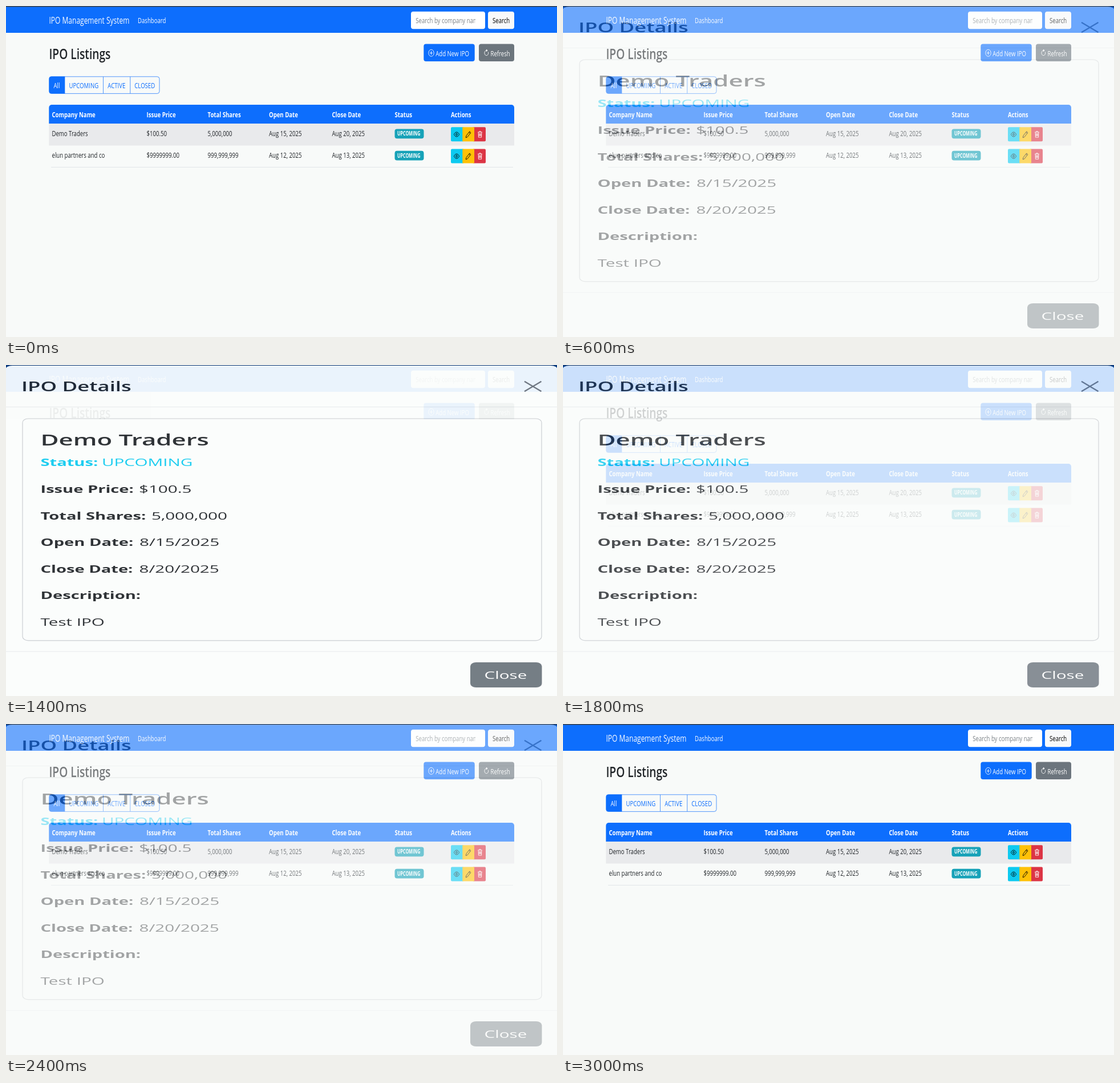
Animation, 966 px wide and 580 px high, one loop 3100 ms. Source, as an HTML page:

```html
<!DOCTYPE html>
<html lang="en">
<head>
<meta charset="utf-8">
<title>IPO Management System</title>
<style>
  html, body { margin: 0; width: 100%; height: 100%; overflow: hidden; background: #fbfdfc; }
  svg { position: absolute; left: 0; top: 0; }
  text { font-family: "Open Sans", "Noto Sans", sans-serif; white-space: pre; }
</style>
</head>
<body>
<svg id="list" width="966" height="580" viewBox="0 0 966 580"></svg>
<svg id="modal" width="966" height="580" viewBox="0 0 966 580"></svg>
<script>
const BLUE = '#0d6efd', INK = '#212529', GRAY = '#6c757d', CYAN = '#0dcaf0';

const ICONS = {
  eye: '<path d="M.7 8s2.6-5 7.3-5 7.3 5 7.3 5-2.6 5-7.3 5-7.3-5-7.3-5z"/><circle cx="8" cy="8" r="2.2"/>',
  pencil: '<path d="M1 15l1.2-4.2L11.5 1.5l3 3-9.3 9.3zM9.8 3.2l3 3"/>',
  trash: '<path d="M1.8 3.4h12.4M6 3.2V1.6h4v1.6M3.4 3.6l.5 11h8.2l.5-11M5.8 6v6M8 6v6M10.2 6v6"/>',
  plus: '<circle cx="8" cy="8" r="7.4"/><path d="M8 4v8M4 8h8"/>',
  refresh: '<path d="M8 3a5.4 5.4 0 1 0 4.9 3.2"/><path d="M8 .8v4.4L10.8 3z" fill="#fff"/>'
};

const rect = (x, y, w, h, fill, r = 0, extra = '') =>
  `<rect x="${x}" y="${y}" width="${w}" height="${h}" rx="${r}" fill="${fill}" ${extra}/>`;

const line = (x1, y1, x2, y2, color, w = 1) =>
  `<path d="M${x1} ${y1}L${x2} ${y2}" stroke="${color}" stroke-width="${w}"/>`;

const icon = (name, cx, cy, color) =>
  `<g transform="translate(${cx} ${cy}) scale(.63 .81) translate(-8 -8)" fill="none" stroke="${color}" stroke-width="1.2">${ICONS[name]}</g>`;

// Each screen has one pixel aspect; all of its text shares it.
const writer = (sx, sy) => (x, y, str, color = INK, size = 16, weight = 400) =>
  `<text transform="translate(${x} ${y}) scale(${sx} ${sy})" font-size="${size}" font-weight="${weight}" fill="${color}">${str}</text>`;

function listScreen() {
  const text = writer(.6, .81);
  const cols = [80.5, 246.5, 353.5, 461, 571.5, 681.5, 780];
  const heads = ['Company Name', 'Issue Price', 'Total Shares', 'Open Date', 'Close Date', 'Status', 'Actions'];
  const rows = [
    ['Demo Traders', '$100.50', '5,000,000', 'Aug 15, 2025', 'Aug 20, 2025'],
    ['elun partners and co', '$9999999.00', '999,999,999', 'Aug 12, 2025', 'Aug 13, 2025']
  ];
  const row = (cells, i) => {
    const y = 38.2 * i;
    return cells.map((c, k) => text(cols[k], 228 + y, c)).join('') +
      rect(681.5, 215.6 + y, 51, 16.6, '#17a2b8', 4) +
      text(686, 227.4 + y, 'UPCOMING', '#fff', 12, 700) +
      rect(780, 212.3 + y, 23, 25, CYAN, 2) +
      rect(818, 212.3 + y, 23, 25, '#dc3545', 2) +
      rect(800.3, 212.3 + y, 20.7, 25, '#ffc107') +
      icon('eye', 790, 225 + y, '#000') +
      icon('pencil', 810.6, 225 + y, '#000') +
      icon('trash', 831, 224.8 + y, '#fff');
  };
  const filters = [[110.5, 'UPCOMING'], [178.3, 'ACTIVE'], [225.3, 'CLOSED']];

  return rect(0, 0, 966, 580, '#f8faf9') +
    rect(0, 0, 966, 47, BLUE) + rect(0, 0, 966, 1.5, '#3b4046') +
    text(75.5, 31, 'IPO Management System', '#fff', 20) +
    text(231, 30, 'Dashboard', '#fff') +
    rect(710, 9.8, 130, 30.5, '#fff', 4) +
    '<clipPath id="field"><rect x="716" y="10" width="107" height="30"/></clipPath>' +
    `<g clip-path="url(#field)">${text(718.3, 30, 'Search by company name', '#7b8186')}</g>` +
    rect(845, 9.8, 46, 30.5, '#f8f9fa', 4) +
    text(853, 30, 'Search', '#000') +
    text(75.5, 92.5, 'IPO Listings', INK, 32, 600) +
    rect(732.3, 66.6, 89.4, 30.5, BLUE, 4) + icon('plus', 745.5, 82.3, '#fff') +
    text(753.3, 87.5, 'Add New IPO', '#fff') +
    rect(829, 66.6, 62, 30.5, GRAY, 4) + icon('refresh', 842.3, 82, '#fff') +
    text(849.5, 87.5, 'Refresh', '#fff') +
    rect(75.8, 123.8, 193.2, 29.6, 'none', 4, `stroke="${BLUE}" stroke-width=".7"`) +
    `<path d="M103.3 123.5H79.5a4 4 0 0 0-4 4v22a4 4 0 0 0 4 4h23.8z" fill="${BLUE}"/>` +
    line(170.5, 124, 170.5, 153, BLUE, .7) + line(217.8, 124, 217.8, 153, BLUE, .7) +
    text(83.5, 144.3, 'All', '#fff') +
    filters.map(([x, s]) => text(x, 144.3, s, BLUE)).join('') +
    `<path d="M75.3 206.2V178a5 5 0 0 1 5-5H886a5 5 0 0 1 5 5v28.2z" fill="${BLUE}"/>` +
    heads.map((h, k) => text(cols[k], 194.6, h, '#fff', 16, 700)).join('') +
    rect(75.3, 206.2, 815.7, 38.3, '#e9eaec') +
    line(79, 282.5, 889, 282.5, '#e1e5e8') +
    rows.map(row).join('');
}

function modalScreen() {
  const text = writer(1.85, 1.158), bold = writer(1.82, 1.158);
  const fields = [
    ['Status:', 168, 'UPCOMING', CYAN],
    ['Issue Price:', 233, '$100.5'],
    ['Total Shares:', 255, '5,000,000'],
    ['Open Date:', 234, '8/15/2025'],
    ['Close Date:', 233.5, '8/20/2025'],
    ['Description:', 0, '']
  ];
  const field = ([label, x, value, color], i) => {
    const y = 177.2 + 46.65 * i;
    return bold(60.5, y, label, color, 16, 700) + text(x, y, value, color);
  };

  return rect(0, 0, 966, 580, '#0b3a7c') +
    rect(-1, 1, 968, 600, '#fbfdfc', 12, 'ry="7"') +
    bold(27, 46.4, 'IPO Details', INK, 20, 600) +
    line(909, 28.8, 938.5, 46.2, '#77797a', 2.4) + line(938.5, 28.8, 909, 46.2, '#77797a', 2.4) +
    line(0, 73.5, 966, 73.5, '#e6e9eb') + line(0, 502, 966, 502, '#e6e9eb') +
    rect(29, 94, 910, 388.8, 'none', 10, 'ry="7" stroke="#c8ccd0" stroke-width="1.2"') +
    bold(60.5, 141.2, 'Demo Traders', INK, 24, 600) +
    fields.map(field).join('') +
    text(60.5, 457.1, 'Test IPO') +
    rect(814, 521, 125.5, 44, GRAY, 10, 'ry="7"') +
    text(838.5, 550.3, 'Close', '#fff');
}

const list = document.getElementById('list'), modal = document.getElementById('modal');
list.innerHTML = listScreen();
modal.innerHTML = modalScreen();

// Stepped crossfade: up over 15 steps, back down over 15.
const STEPS = 31, PEAK = 15, STEP_MS = 100;
const mix = i => 1 - Math.abs(i - PEAK) / PEAK;

function play(el, pose) {
  const keys = Array.from({ length: STEPS + 1 }, (_, i) =>
    ({ ...pose(mix(Math.min(i, STEPS - 1))), offset: i / STEPS, easing: 'steps(1, end)' }));
  const anim = el.animate(keys, { duration: STEPS * STEP_MS, iterations: Infinity });
  anim.startTime = document.timeline.currentTime;
}

play(modal, m => ({ opacity: m }));
// The table drops out just before the dialog is solid.
play(list, m => ({ clipPath: `inset(0px 0px ${m > .9 ? 485 : 0}px 0px)` }));
</script>
</body>
</html>
```
